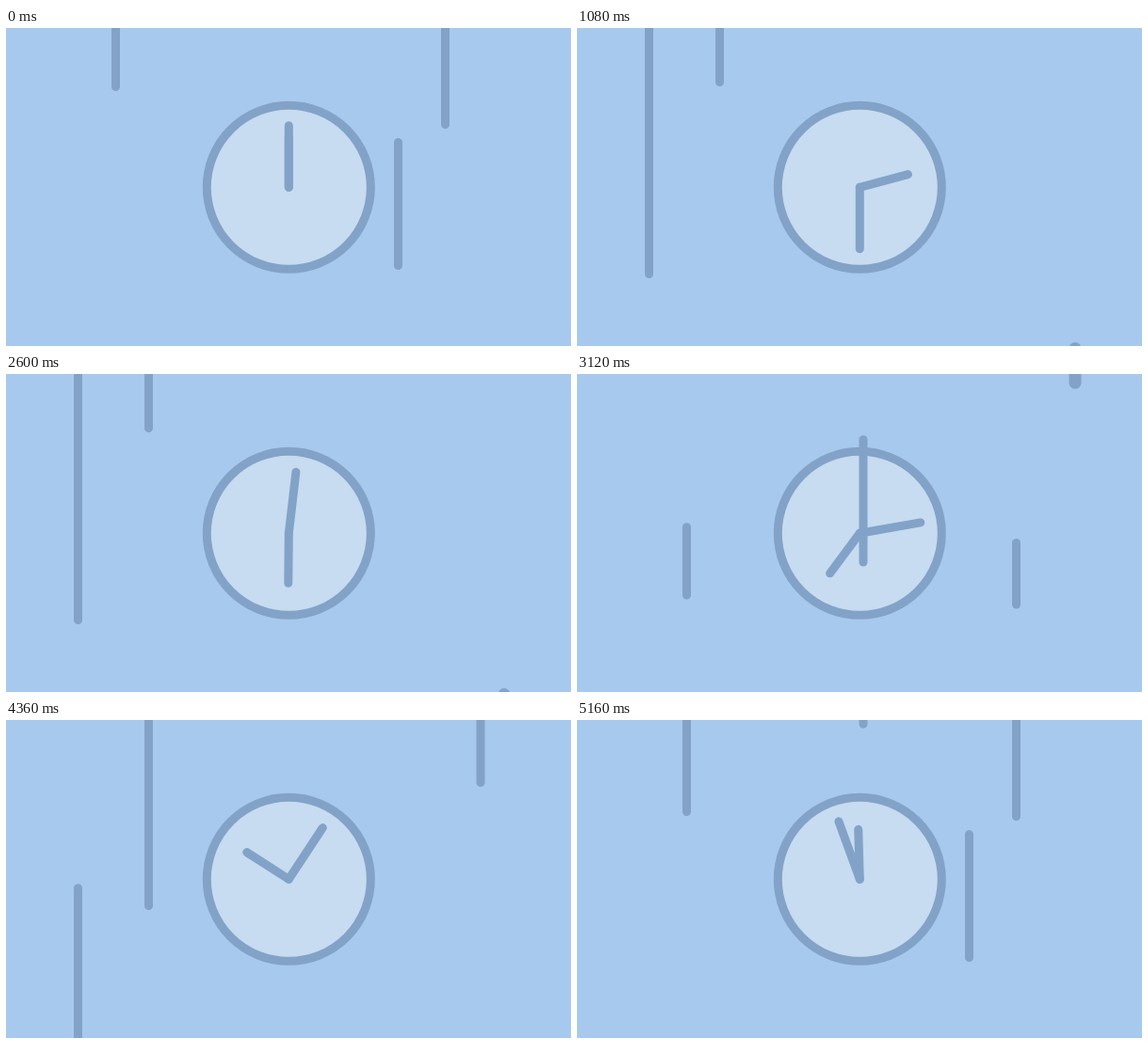
Write an HTML page with a canvas that moves like this. It is 600x338 px and loops after 5200 ms.

```html
<!DOCTYPE html>
<html lang="en">
<head>
<meta charset="utf-8">
<title>Clock</title>
<style>
html, body { margin: 0; width: 100%; height: 100%; overflow: hidden; background: #a6c9ed; }
canvas { display: block; width: 600px; height: 338px; }
</style>
</head>
<body>
<canvas id="stage" width="600" height="338"></canvas>
<script>
const ctx = document.getElementById('stage').getContext('2d');
const STEP = 40, STEPS = 130, CYCLE = STEPS / 3;
const BACK = '#a6c9ed', FACE = '#c7dbf1', INK = '#82a3c7';
const CX = 300.3, CY = 169.3, TURN = Math.PI * 2;
const THIN = 9, THICK = 13, SLOW = 35, FAST = 46, TAIL_DELAY = 3.8;

// A streak rises from its base again and again; first and every are in steps
function streak(x, base, first, { every = 43, speed = SLOW, width = THIN } = {}) {
  return { x, base, first, every, speed, width };
}

const streaks = [
  streak(39, 291.5, 0.02),
  streak(76.5, 360, 14.06, { speed: FAST }),
  streak(116.5, 235, -10.73, { every: CYCLE }),
  streak(151.5, 290, 9.56),
  streak(304, 200, -12.39, { every: CYCLE }),
  streak(354, 385, 80.45, { every: STEPS, speed: FAST, width: THICK }),
  streak(416.5, 252.5, -3.74),
  streak(466.5, 245, -9.87),
  streak(504, 250, 6.96),
  streak(529, 370, 21.36, { speed: FAST, width: THICK })
];

function line(x1, y1, x2, y2, width) {
  ctx.lineWidth = width;
  ctx.beginPath();
  ctx.moveTo(x1, y1);
  ctx.lineTo(x2, y2);
  ctx.stroke();
}

function hand(turns, length) {
  const a = turns * TURN;
  line(CX, CY, CX + Math.sin(a) * length, CY - Math.cos(a) * length, THIN);
}

// Distance in steps with a soft start
function soft(u) {
  if (u <= 0) return 0;
  return u < 4 ? u * u / 8 : u - 2;
}

// Every other wave comes a little late
function delay(start) {
  const t = start % 80;
  return t > 0 && t < 28 ? 5 : 0;
}

function drawStreak({ x, base, first, every, speed, width }, n) {
  for (let start = first; start < n; start += every) {
    const age = n - start - delay(start);
    if (age <= 0) continue;
    const head = base - speed * age;
    const tail = base - speed * soft(age - TAIL_DELAY);
    if (tail > -width) line(x, head, x, tail, width);
  }
}

function drawClock(n) {
  ctx.fillStyle = FACE;
  ctx.lineWidth = THIN;
  ctx.beginPath();
  ctx.arc(CX, CY, 87, 0, TURN);
  ctx.fill();
  ctx.stroke();
  const hours = n / 10.8;
  hand(hours / 12, 53);
  hand(hours, 65.5);
}

function draw(n) {
  ctx.fillStyle = BACK;
  ctx.fillRect(0, 0, 600, 338);
  ctx.strokeStyle = INK;
  ctx.lineCap = 'round';
  drawClock(n);
  for (const s of streaks) drawStreak(s, n);
}

const begin = performance.now();
function tick() {
  draw(Math.floor((performance.now() - begin) / STEP) % STEPS);
  requestAnimationFrame(tick);
}
tick();
</script>
</body>
</html>
```
